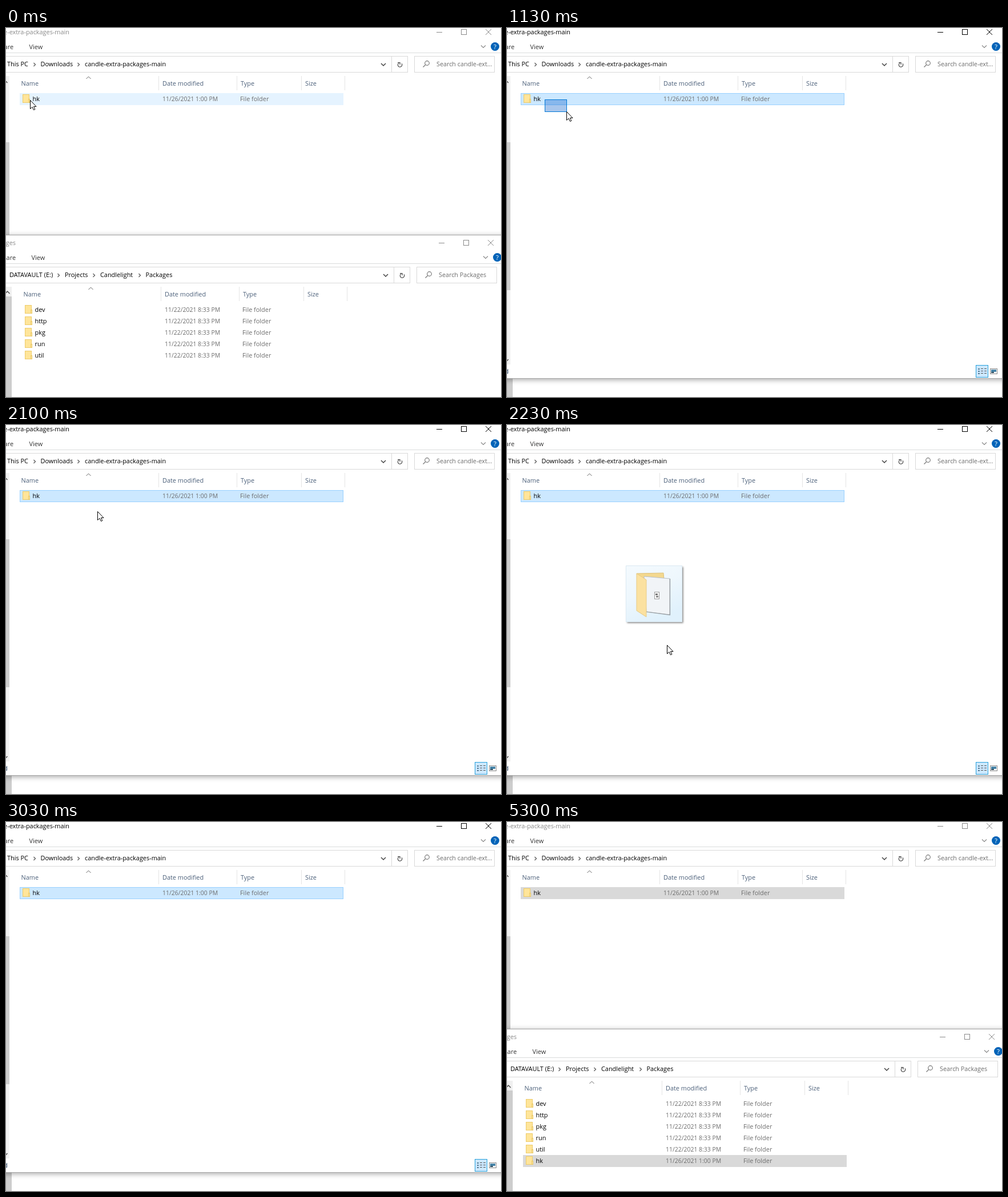
Recreate the animation shown at these times as an HTML page with a canvas. Size 867 by 646 pixels, loop 5.46 s.

```html
<!DOCTYPE html>
<html lang="en">
<head>
<meta charset="utf-8">
<title>Copying a folder</title>
<style>
html, body { margin: 0; width: 100%; height: 100%; overflow: hidden; background: #fff; }
canvas { display: block; }
</style>
</head>
<body>
<canvas id="stage" width="867" height="646"></canvas>
<script>
const g = document.getElementById('stage').getContext('2d');
const LOOP = 5460;
const GRAY = '#6d6d6d', LINE = '#d9d9d9', HEAD = '#4c607a';

// Pointer path: time, x, y
const path = [
  [0, 42, 126], [120, 46, 138], [230, 56, 150], [360, 70, 141], [500, 78, 131],
  [800, 78, 131], [830, 77, 130], [930, 66, 125], [1000, 66, 125], [1180, 118, 154],
  [1370, 163, 186], [1400, 158, 172], [1500, 146, 143], [1670, 146, 143], [1800, 145, 134],
  [1900, 141, 119], [2070, 141, 121], [2110, 165, 160], [2190, 257, 335], [2230, 279, 384],
  [2390, 380, 589], [2430, 389, 611], [2600, 408, 655], [2700, 410, 663], [LOOP, 410, 670]
];
const ANCHOR = { x: 66, y: 125 };
const GHOST_LAG = 40;

function pointer(t) {
  const i = Math.max(1, path.findIndex(k => k[0] > t));
  const [t0, x0, y0] = path[i - 1], [t1, x1, y1] = path[i];
  const p = (t - t0) / (t1 - t0);
  return { x: Math.round(x0 + (x1 - x0) * p), y: Math.round(y0 + (y1 - y0) * p) };
}

function box(x, y, w, h, fill, edge) {
  if (fill) { g.fillStyle = fill; g.fillRect(x, y, w, h); }
  if (edge) { g.strokeStyle = edge; g.lineWidth = 1; g.strokeRect(x + .5, y + .5, w - 1, h - 1); }
}

function text(str, x, y, color = '#000', size = 10.9, align = 'left') {
  g.font = `${size}px "Open Sans", "Noto Sans", sans-serif`;
  g.textAlign = align;
  g.fillStyle = color;
  g.fillText(str, x, y);
}

function shape(points, fill, edge, width = 1) {
  g.beginPath();
  points.forEach(([x, y]) => g.lineTo(x, y));
  if (fill) { g.closePath(); g.fillStyle = fill; g.fill(); }
  if (edge) { g.strokeStyle = edge; g.lineWidth = width; g.stroke(); }
}

// Open chevron around a centre; (dx, dy) points to the tip
function chevron(x, y, dx, dy, color = '#555', width = 1.2) {
  const s = dx ? 3 : 4;
  const ends = dx ? [[x - dx, y - s], [x - dx, y + s]] : [[x - s, y - dy], [x + s, y - dy]];
  shape([ends[0], [x + dx, y + dy], ends[1]], null, color, width);
}

function ring(x, y, r, color, from = 0, to = 7) {
  g.beginPath();
  g.arc(x, y, r, from, to);
  g.strokeStyle = color;
  g.lineWidth = 1.2;
  g.stroke();
}

function folder(x, y) {
  box(x, y, 12, 15, '#ffe59a', '#edcb69');
  box(x + 10, y + 8, 3, 7, '#ffe9a9', '#e9c763');
}

const rowStyles = {
  hover: ['#e5f3ff'],
  selected: ['#cce8ff', '#99d1ff'],
  idle: ['#d9d9d9']
};

function row(y, name, date, style) {
  if (style) box(24, y, 567, 21, ...rowStyles[style]);
  folder(29, y + 2);
  text(name, 46.5, y + 14);
  text(date, 274, y + 14, GRAY, 10.45);
  text('File folder', 410, y + 14, GRAY);
}

function explorer(w, active) {
  g.save();
  g.translate(w.x, w.y);

  g.save();
  g.shadowColor = 'rgba(0,0,0,.35)';
  g.shadowBlur = 9;
  g.shadowOffsetY = 2;
  box(-40, -7, 960, w.height, '#fff');
  g.restore();
  box(-40, -7, 960, w.height, '#fff', '#a6a6a6');

  // Title bar and window buttons
  const ink = active ? '#000' : '#8a8a8a';
  text(w.title, 111 + w.titleShift, 11, ink, 10.9, 'right');
  box(754, 7, 10, 1, ink);
  box(797, 2, 10, 10, null, ink);
  shape([[840, 2], [850, 12]], null, ink);
  shape([[850, 2], [840, 12]], null, ink);

  // Ribbon tabs
  text('Share', 13, 37, '#333', 10.9, 'right');
  text('View', 40.5, 37, '#333');
  chevron(836, 32.5, 0, 2, '#8a8a8a');
  g.beginPath();
  g.arc(856.5, 32.5, 7.5, 0, 7);
  g.fillStyle = '#0063b8';
  g.fill();
  text('?', 856.5, 36.5, '#fff', 11.5, 'center');
  box(-20, 43, 900, 1, '#dadbdc');

  // Address and search
  box(-20, 49, 724, 29, '#fff', LINE);
  box(675, 49, 1, 29, LINE);
  w.crumbs.forEach(([name, x]) => text(name, x, 67));
  w.arrows.forEach(x => chevron(x, 64, 1.5, 0));
  if (w.extraArrow) chevron(298, 64, 1.5, 0);
  chevron(661, 64, 0, 2, '#444', 1.5);
  ring(690, 64.5, 3.7, '#444', -.6, 4.2);
  shape([[686, 60.5], [690, 60.5], [690, 64]], null, '#444', 1.2);
  box(715, 49, 141, 29, '#fff', LINE);
  ring(737.5, 61.5, 3.8, '#777');
  shape([[734.8, 64.3], [730.5, 68.5]], null, '#777', 1.2);
  text(w.search, 754, 67, GRAY, 10.8);

  // Navigation scrollbar
  box(-11, 84, 17, 505, '#f0f0f0');
  box(-11, w.thumb[0], 17, w.thumb[1], '#cdcdcd');
  chevron(-1.5, 94, 0, -2, '#505050', 1.5);
  chevron(-1.5, 582, 0, 2, '#505050', 1.5);

  // Column headers
  [['Name', 26.5], ['Date modified', 274], ['Type', 411], ['Size', 524]]
    .forEach(([name, x]) => text(name, x, 101, HEAD));
  [267, 404, 517, 593].forEach(x => box(x, 84, 1, 25, '#e5e5e5'));
  chevron(144.5, 87, 0, -2, '#666', 1);

  w.rows.forEach(([name, date, style], i) => row(114 + 20 * i, name, date, style));

  // Status bar
  if (active) text('1 item selected', 3, 605, '#1e395b', 10.9, 'right');
  box(821, 590, 22, 22, '#cce8ff', '#26a0da');
  for (let y = 596; y < 608; y += 4) {
    box(825, y, 3, 2, '#5b7f95');
    box(830, y, 4, 1, '#555');
    box(836, y, 4, 1, '#555');
  }
  box(846, 596, 13, 10, '#fff', '#888');
  box(848, 598, 9, 4, '#4684a8');
  box(848, 602, 5, 2, '#2e4c5e');
  g.restore();
}

function ghost(x, y) {
  g.save();
  g.translate(x, y);
  const glow = g.createLinearGradient(0, 0, 45, 100);
  glow.addColorStop(0, '#f4fafe');
  glow.addColorStop(.5, '#eef7fd');
  glow.addColorStop(1, '#e0f1fc');
  g.save();
  g.shadowColor = 'rgba(0,0,0,.5)';
  g.shadowBlur = 3;
  g.shadowOffsetX = g.shadowOffsetY = 1.5;
  box(0, 0, 99, 99, '#eef7fd');
  g.restore();
  box(0, 0, 99, 99, glow, '#dbeaf3');
  shape([[19, 14], [66, 13], [67, 24], [67, 80], [36, 80]], '#f3d88f', '#dfc27a');
  shape([[32, 19], [77, 23], [77, 86], [36, 81]], '#f1f4f7', '#b9bfc4');
  shape([[77.5, 23], [77.5, 86.5], [36, 81]], null, '#949a9e', 1.2);
  shape([[19, 14], [36, 25], [36, 90], [19, 79]], '#fbe1a0', '#e7cb86');
  box(50, 46, 9, 13, '#fff', '#999');
  box(52, 49, 4, 3, '#777');
  box(53, 53, 4, 3, '#888');
  g.restore();
}

function cursor({ x, y }) {
  g.save();
  g.translate(x + .5, y + .5);
  g.lineJoin = 'miter';
  shape([[0, 0], [0, 15], [3.5, 11.8], [6, 17], [8.3, 16], [6, 11], [10.5, 11], [0, 0]], '#fff', '#000');
  g.restore();
}

function draw(t) {
  const at = pointer(t);
  const upperFront = t >= 960 && t < 3060;
  const lowerActive = t >= 3060 && t < 5300;
  const overRow = at.y >= 114 && at.y < 135;
  const sourceStyle = t >= 3060 ? 'idle' : t >= 960 ? 'selected' : overRow && 'hover';
  const oldDate = '11/22/2021 8:33 PM', newDate = '11/26/2021 1:00 PM';

  const upper = {
    x: 0, y: 0, height: 621,
    title: 'candle-extra-packages-main', titleShift: 0,
    crumbs: [['This PC', 2], ['Downloads', 60.5], ['candle-extra-packages-main', 138]],
    arrows: [50, 127],
    search: 'Search candle-ext...',
    thumb: [200, 259],
    rows: [['hk', newDate, sourceStyle]]
  };
  const lower = {
    x: 4, y: 369, height: 621,
    title: 'Packages', titleShift: -98,
    crumbs: [['DATAVAULT (E:)', 2], ['Projects', 99], ['Candlelight', 161], ['Packages', 240.5]],
    arrows: [88, 150, 230],
    extraArrow: t >= 3370 && t < 5300,
    search: 'Search Packages',
    thumb: [101, 400],
    rows: ['dev', 'http', 'pkg', 'run', 'util'].map(name => [name, oldDate])
  };
  if (t >= 3370)
    lower.rows.push(['hk', newDate, t >= 5300 ? 'idle' : t >= 3470 && 'selected']);

  g.clearRect(0, 0, 867, 646);
  if (upperFront) {
    explorer(lower, false);
    explorer(upper, true);
  } else {
    explorer(upper, false);
    explorer(lower, lowerActive);
  }

  if (t >= 1000 && t < 1800)
    box(ANCHOR.x, ANCHOR.y, at.x - ANCHOR.x + 1, at.y - ANCHOR.y + 1, 'rgba(0,90,200,.34)', '#0078d7');
  if (t >= 2120 && t < 3030) {
    const held = pointer(t - GHOST_LAG);
    ghost(held.x - 50, held.y - 90);
  }
  cursor(at);
}

function tick(now) {
  draw(now % LOOP);
  requestAnimationFrame(tick);
}
requestAnimationFrame(tick);
</script>
</body>
</html>
```
